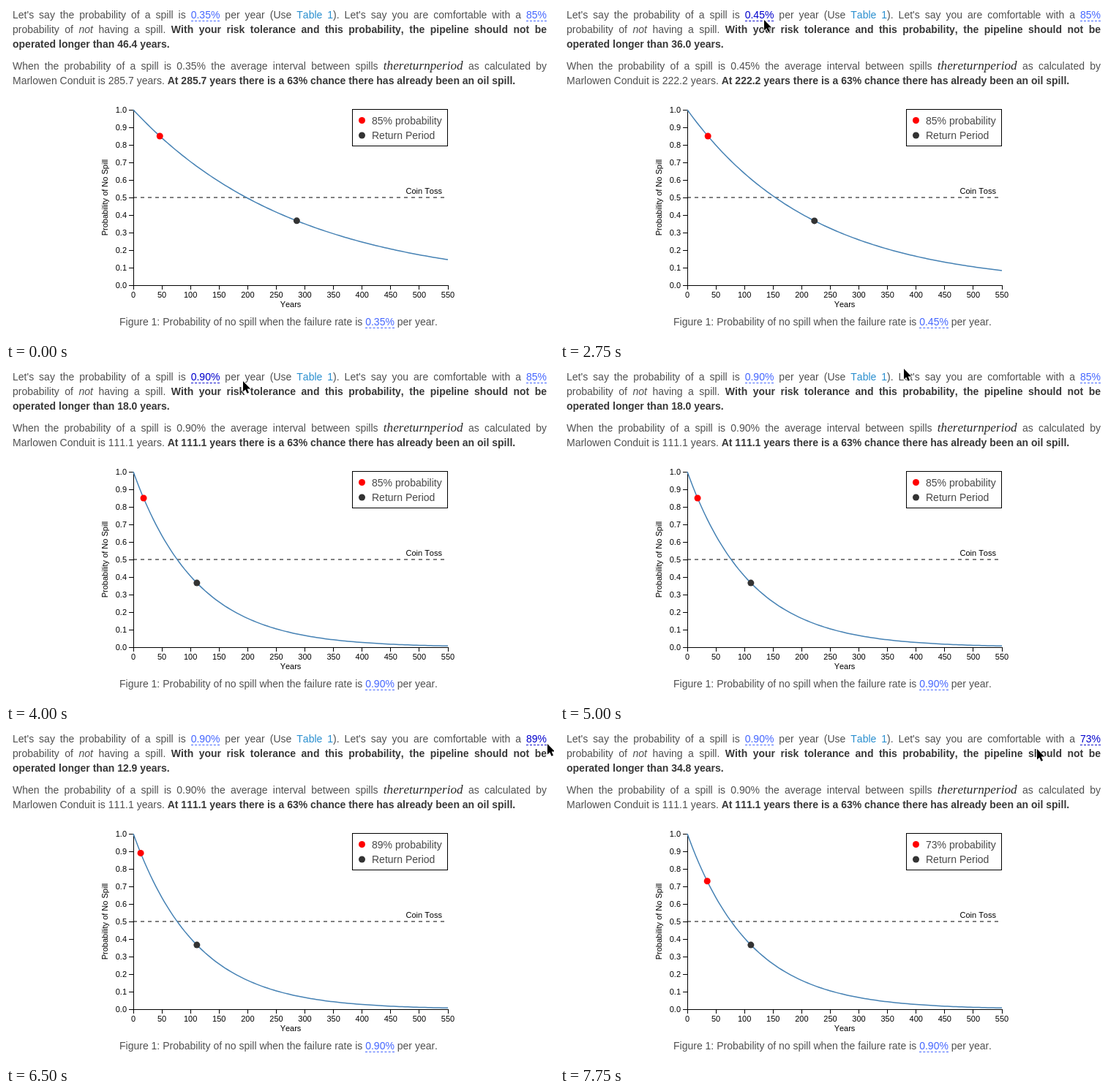
These frames come from a looping animation (749 by 457 pixels, 8000 ms). An HTML page:

```html
<!DOCTYPE html>
<html lang="en">
<head>
<meta charset="utf-8">
<title>Spill probability</title>
<style>
  html, body { margin: 0; width: 100%; height: 100%; overflow: hidden; background: #fff; }
  #stage { position: relative; width: 749px; height: 457px; overflow: hidden; font-kerning: none;
    font: 14px/20px "Liberation Sans", Arial, sans-serif; font-kerning: none; color: #505050; }
  .line { position: absolute; left: 9px; width: 730px; white-space: nowrap; }
  .full { text-align: justify; text-align-last: justify; white-space: normal; }
  .caption { left: 155px; top: 422px; }
  b { color: #383838; }
  .math { font: italic 17.2px/0 "Liberation Serif", Times, serif; font-kerning: none; color: #2a2a2a; }
  .link { color: #2a8fcf; }
  .adjust { color: #46f; border-bottom: 1px dashed #46f; }
  .adjust.hot { color: #00c; border-color: #00c; }
  svg { position: absolute; left: 0; top: 0; }
  svg text { font: 11px "Liberation Sans", Arial, sans-serif; font-kerning: none; fill: #000; }
  svg .legend { font-size: 14px; fill: #484848; }
  .axis { fill: none; stroke: #000; shape-rendering: crispEdges; }
</style>
</head>
<body>
<div id="stage">
  <div class="line full" style="top:2px">Let's say the probability of a spill is <span class="adjust rate" id="rateLink"></span> per year (Use <span class="link">Table 1</span>). Let's say you are comfortable with a <span class="adjust pct" id="pctLink"></span></div>
  <div class="line full" style="top:22px">probability of <i>not</i> having a spill. <b>With your risk tolerance and this probability, the pipeline should not be</b></div>
  <div class="line" style="top:42px"><b>operated longer than <span class="limit"></span> years.</b></div>
  <div class="line full" style="top:72px">When the probability of a spill is <span class="rate"></span> the average interval between spills <span class="math">thereturnperiod</span> as calculated by</div>
  <div class="line" style="top:92px">Marlowen Conduit is <span class="period"></span> years. <b>At <span class="period"></span> years there is a 63% chance there has already been an oil spill.</b></div>

  <svg width="749" height="457" viewBox="0 0 749 457">
    <path id="axes" class="axis"/>
    <g id="labels"></g>
    <text x="389" y="412" text-anchor="middle">Years</text>
    <text transform="translate(139 262) rotate(-90)" text-anchor="middle">Probability of No Spill</text>
    <path d="M174 262H604" stroke="#000" stroke-dasharray="5 5"/>
    <text x="596" y="257" text-anchor="end">Coin Toss</text>
    <path id="curve" fill="none" stroke="steelblue" stroke-width="1.5"/>
    <circle id="limitDot" r="4.5" fill="red"/>
    <circle id="periodDot" r="4.5" fill="#333"/>
    <rect x="473.5" y="141.5" width="130" height="50" fill="none" stroke="#000"/>
    <circle cx="486.5" cy="156.5" r="4.5" fill="red"/>
    <circle cx="486.5" cy="177" r="4.5" fill="#333"/>
    <text class="legend" x="500" y="162"><tspan class="pct"></tspan> probability</text>
    <text class="legend" x="500" y="182">Return Period</text>
  </svg>

  <div class="line caption">Figure 1: Probability of no spill when the failure rate is <span class="adjust rate"></span> per year.</div>

  <svg width="749" height="457" viewBox="0 0 749 457">
    <path id="cursor" d="M0 0V14.5L3.3 11.4L5.6 16.7L8 15.7L5.7 10.5H10.2Z"
      fill="#000" stroke="#fff" stroke-width="1.6" stroke-linejoin="round" paint-order="stroke"/>
  </svg>
</div>
<script>
const LOOP = 8000, STEP = 250;
const $ = id => document.getElementById(id);
const setText = (name, text) =>
  document.querySelectorAll("." + name).forEach(el => { el.textContent = text; });
const place = (el, x, y) => el.setAttribute("transform", `translate(${x} ${y})`);

const xOf = years => 174 + years * 430 / 550;
const yOf = chance => 382 - chance * 240;

// Cursor positions by step outside the drags; each holds until the next.
const path = [
  [2, 246, 17], [3, 252, 8], [4, 259, 1], [7, 264, 11], [8, 270, 20], [9, 269, 19],
  [19, 360, 3], [20, 470, 1], [21, 580, 14], [22, 668, 30], [23, 713, 20]
];
const pcts = [85, 86, 89, 93, 95, 93, 83, 73];
const RATE_DRAG = 11, RATE_END = 19, PCT_DRAG = 24;

function drawAxes() {
  let d = "M168 142H174V382H168M174 388V382H604V388", labels = "";
  for (let i = 0; i <= 10; i++) {
    const y = yOf(i / 10);
    d += `M168 ${y}H174`;
    labels += `<text x="165" y="${y + 3.5}" text-anchor="end">${(i / 10).toFixed(1)}</text>`;
  }
  for (let years = 0; years <= 550; years += 50) {
    const x = xOf(years);
    d += `M${x} 382V388`;
    labels += `<text x="${x}" y="398.8" text-anchor="middle">${years}</text>`;
  }
  $("axes").setAttribute("d", d);
  $("labels").innerHTML = labels;
}

function cursorAt(step, rate, pct) {
  if (step >= PCT_DRAG) return [718 + (pct - 85) * 5.5, step < 30 ? 19 : 19 + (step - 29) * 3.5];
  if (step >= RATE_DRAG && step < RATE_END) return [269 + (rate - 0.35) * 100, step < 13 ? 19 : 18];
  const key = path.filter(p => p[0] <= step).pop();
  return key ? key.slice(1) : [-50, -50];
}

function render(step) {
  const rate = step < RATE_DRAG ? 0.35 : Math.min(0.9, 0.35 + (step - RATE_DRAG + 1) * 0.1);
  const pct = pcts[Math.max(0, step - PCT_DRAG)];
  const keep = 1 - rate / 100;
  const limit = Math.log(pct / 100) / Math.log(keep);
  const period = 100 / rate;

  setText("rate", rate.toFixed(2) + "%");
  setText("pct", pct + "%");
  setText("limit", limit.toFixed(1));
  setText("period", period.toFixed(1));
  $("rateLink").classList.toggle("hot", step >= 8 && step <= 16);
  $("pctLink").classList.toggle("hot", step >= 23);

  const points = [];
  for (let years = 0; years <= 550; years += 5)
    points.push(xOf(years).toFixed(2) + " " + yOf(keep ** years).toFixed(2));
  $("curve").setAttribute("d", "M" + points.join("L"));
  place($("limitDot"), xOf(limit), yOf(pct / 100));
  place($("periodDot"), xOf(period), yOf(keep ** period));
  place($("cursor"), ...cursorAt(step, rate, pct));
}

let shown = -1;
const start = performance.now();
function tick() {
  const step = Math.floor((performance.now() - start) % LOOP / STEP);
  if (step !== shown) render(shown = step);
  requestAnimationFrame(tick);
}
drawAxes();
tick();
</script>
</body>
</html>
```
